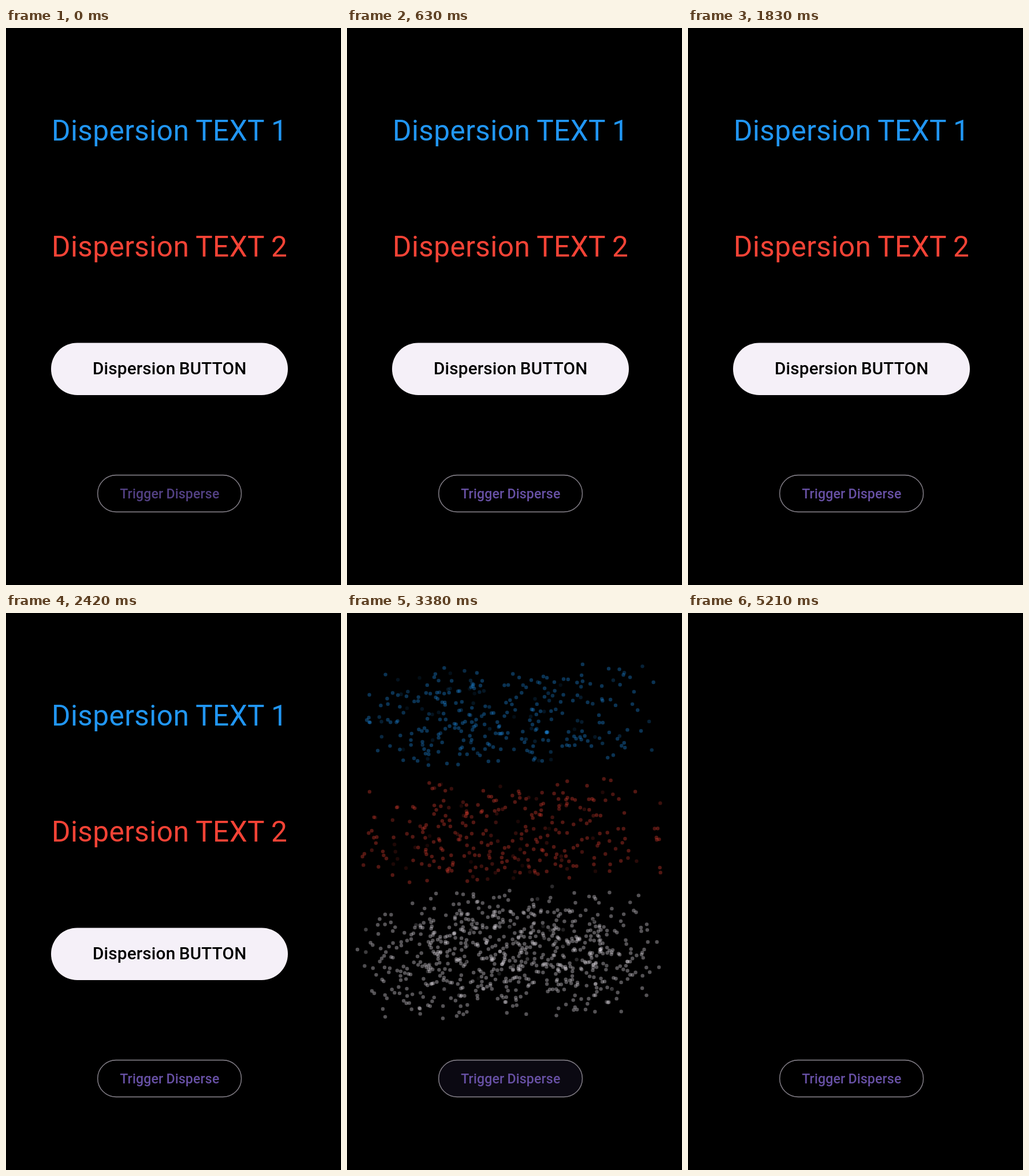
These frames come from a looping animation (580 by 965 pixels, 5.25 s). An HTML page with a canvas:

```html
<!DOCTYPE html>
<html lang="en">
<head>
<meta charset="utf-8">
<title>Dispersion</title>
<style>
  html, body { margin: 0; width: 100%; height: 100%; overflow: hidden; background: #000; }
  canvas { display: block; }
</style>
</head>
<body>
<canvas id="stage" width="580" height="965"></canvas>
<script>
const WIDTH = 580, HEIGHT = 965, LOOP = 5250;
const BURST_START = 2760, BURST_TIME = 1050, SPREAD = 79, DOT_RADIUS = 3.2;
const ctx = document.getElementById('stage').getContext('2d');

const clamp = v => Math.min(1, Math.max(0, v));
const ramp = (t, from, to) => clamp((t - from) / (to - from));
const easeOut = p => 1 - (1 - p) ** 3;

function seeded(seed) {
  return () => {
    seed = (seed + 0x6D2B79F5) | 0;
    let x = Math.imul(seed ^ (seed >>> 15), 1 | seed);
    x = (x + Math.imul(x ^ (x >>> 7), 61 | x)) ^ x;
    return ((x ^ (x >>> 14)) >>> 0) / 4294967296;
  };
}

function text(c, str, x, y, { size, weight = 400, color, spacing, align = 'left' }) {
  c.font = `${weight} ${size}px Roboto, sans-serif`;
  c.letterSpacing = spacing + 'px';
  c.wordSpacing = -0.034 * size + 'px';
  c.textAlign = align;
  c.fillStyle = color;
  c.fillText(str, x, y);
}

function pill(c, x, y, w, h) {
  c.beginPath();
  c.roundRect(x, y, w, h, h / 2);
}

const headline = (str, y, color) => c =>
  text(c, str, 79, y, { size: 49.5, color, spacing: 0.41 });

function bigButton(c) {
  pill(c, 78, 545.4, 410, 90.5);
  c.fillStyle = '#f5f0f8';
  c.fill();
  text(c, 'Dispersion BUTTON', 283.2, 600.3,
    { size: 29.7, weight: 500, color: '#000', spacing: 0.16, align: 'center' });
}

function trigger(c, t) {
  const press = ramp(t, 2700, 2820) * (1 - ramp(t, 3380, 3600));
  pill(c, 158.7, 774.6, 248.8, 63.8);
  c.fillStyle = `rgba(103, 80, 164, ${0.11 * press})`;
  c.fill();
  c.strokeStyle = '#7c7880';
  c.lineWidth = 1.6;
  c.stroke();
  c.globalAlpha = 0.8 + 0.2 * ramp(t, 30, 160);
  text(c, 'Trigger Disperse', 283.3, 815,
    { size: 23.1, weight: 500, color: '#6750a4', spacing: 0.16, align: 'center' });
  c.globalAlpha = 1;
}

// Picks random painted pixels of a widget and gives each a drift.
function shatter(draw, top, height, count, seed) {
  const copy = document.createElement('canvas');
  copy.width = WIDTH;
  copy.height = HEIGHT;
  const c = copy.getContext('2d', { willReadFrequently: true });
  draw(c);
  const { data } = c.getImageData(0, top, WIDTH, height);
  const painted = [];
  for (let i = 0; i < WIDTH * height; i++) if (data[i * 4 + 3] > 60) painted.push(i);
  const random = seeded(seed);
  const drift = () => (random() * 2 - 1) * SPREAD;
  return Array.from({ length: painted.length ? count : 0 }, () => {
    const i = painted[Math.floor(random() * painted.length)];
    const [r, g, b, a] = data.slice(i * 4, i * 4 + 4);
    return {
      x: i % WIDTH, y: top + Math.floor(i / WIDTH),
      dx: drift(), dy: drift(),
      color: `rgb(${r}, ${g}, ${b})`, alpha: a / 255
    };
  });
}

const widgets = [
  { draw: headline('Dispersion TEXT 1', 195.2, '#2196f3'), top: 150, height: 65, count: 300 },
  { draw: headline('Dispersion TEXT 2', 396.4, '#f44336'), top: 350, height: 65, count: 300 },
  { draw: bigButton, top: 540, height: 100, count: 760 }
];
widgets.forEach((w, i) => w.dots = shatter(w.draw, w.top, w.height, w.count, 17 + i));

function drawDots(dots, p) {
  const reach = easeOut(p);
  const fade = (1 - p) ** 1.2;
  for (const d of dots) {
    ctx.globalAlpha = d.alpha * fade;
    ctx.fillStyle = d.color;
    ctx.beginPath();
    ctx.arc(d.x + d.dx * reach, d.y + d.dy * reach, DOT_RADIUS, 0, Math.PI * 2);
    ctx.fill();
  }
  ctx.globalAlpha = 1;
}

function render(t) {
  ctx.fillStyle = '#000';
  ctx.fillRect(0, 0, WIDTH, HEIGHT);
  const p = ramp(t, BURST_START, BURST_START + BURST_TIME);
  for (const w of widgets) {
    if (p === 0) w.draw(ctx);
    else if (p < 1) drawDots(w.dots, p);
  }
  trigger(ctx, t);
}

function tick() {
  render(performance.now() % LOOP);
  requestAnimationFrame(tick);
}
tick();
</script>
</body>
</html>
```
